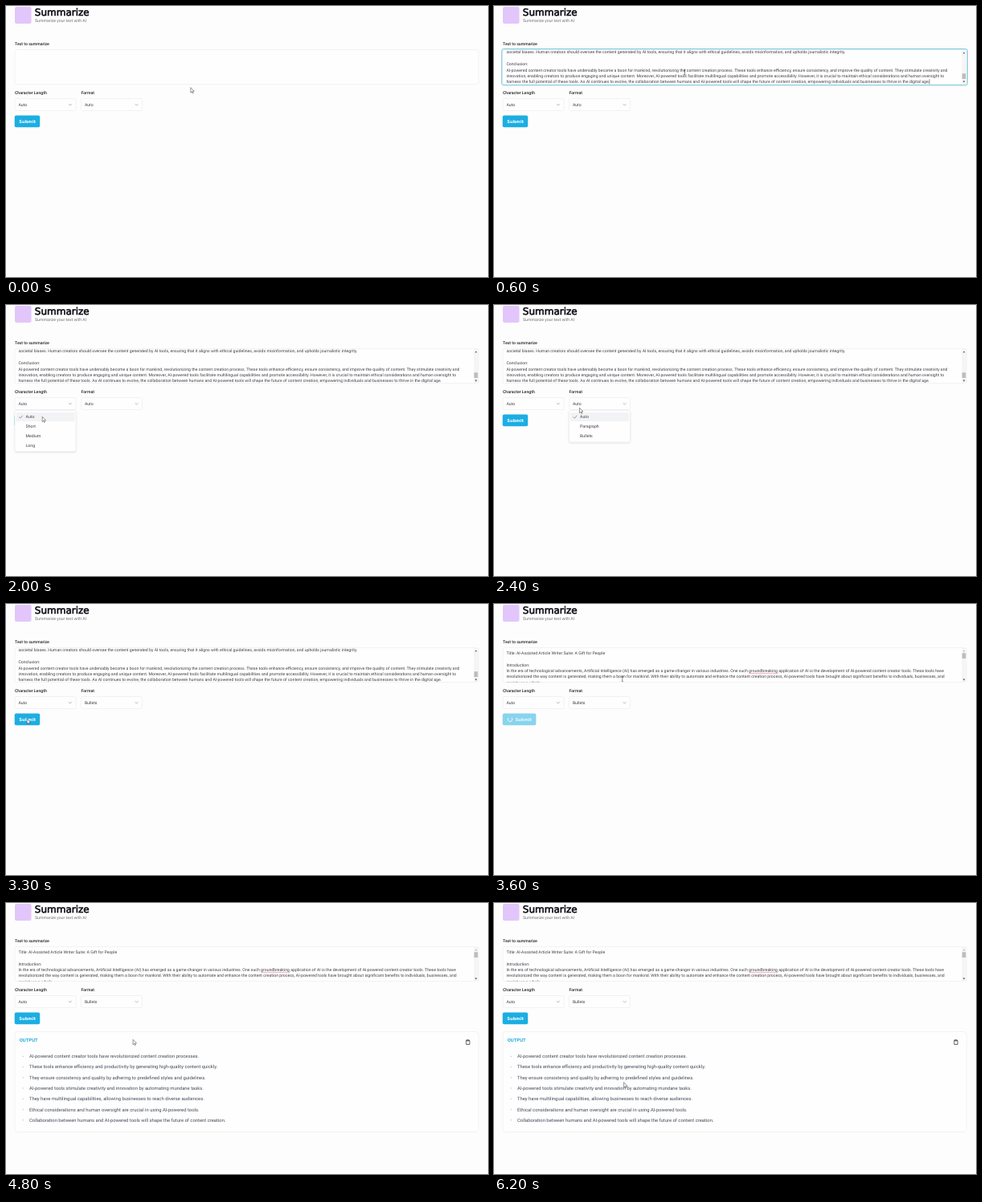
These frames come from a looping animation (600 px wide and 338 px high, 7.3 s). An HTML page:

```html
<!DOCTYPE html>
<html lang="en">
<head>
<meta charset="utf-8">
<title>Summarize</title>
<style>
  html, body { margin: 0; width: 100%; height: 100%; overflow: hidden; background: #fdfdfd; }
  svg { display: block; width: 100vw; height: 100vh; }
  text { font: 5.165px Roboto, sans-serif; fill: #3f3f46; white-space: pre; text-rendering: geometricPrecision; }
  .label { font-weight: 500; fill: #222228; }
  .muted { fill: #71717a; }
  .title { font: 12px "DejaVu Sans", sans-serif; fill: #0c0c14; stroke: #0c0c14; stroke-width: .6; }
  .cta { font: bold 5.15px "DejaVu Sans", sans-serif; fill: #fff; }
  .list text { font-size: 5.89px; fill: #434a57; }
  .list .head { font-weight: 700; fill: #1cabdf; }
  .box { fill: #fefefe; stroke: #e6e7ea; stroke-width: .5; }
  .line { fill: none; stroke: #52525b; stroke-width: .55; stroke-linecap: round; stroke-linejoin: round; }
</style>
</head>
<body>
<svg id="stage" viewBox="0 0 600 338">
  <defs>
    <clipPath id="view"><rect x="11" y="54.8" width="577" height="42.6"/></clipPath>
    <filter id="shadow" x="-10%" y="-10%" width="120%" height="130%">
      <feDropShadow dx="0" dy="1" stdDeviation="1" flood-color="#000" flood-opacity=".12"/>
    </filter>
  </defs>
  <rect width="600" height="338" fill="#fdfdfd"/>
  <rect x="11" y="1" width="20.5" height="21" rx="2" fill="#e2c6fb"/>
  <text class="title" x="35.8" y="12.2">Summarize</text>
  <text class="muted" x="36" y="19.9">Summarize your text with AI</text>
  <text class="label" x="11" y="49.1">Text to summarize</text>
  <rect class="box" x="11" y="54.5" width="577.3" height="43" rx="2"/>
  <rect id="ring" x="9.7" y="53.6" width="579.6" height="45.2" rx="2.5" fill="none" stroke="#55b9d6" stroke-width=".85"/>
  <g clip-path="url(#view)">
    <g id="ending"></g>
    <g id="opening"></g>
  </g>
  <path id="caret" d="M542 91.4v6" stroke="#111" stroke-width=".5"/>
  <g id="bar">
    <rect x="582.3" y="55" width="5.5" height="42.2" fill="#f5f5f5"/>
    <rect id="thumb" x="582.7" width="4.6" height="6.8" fill="#bdbdbd"/>
    <path id="up" d="M583.6 59.2h2.8l-1.4-1.8z"/>
    <path d="M583.6 93.6h2.8l-1.4 1.8z" fill="#505050"/>
  </g>
  <text class="label" x="11" y="110.2">Character Length</text>
  <text class="label" x="93.4" y="110.2">Format</text>
  <g id="selects"></g>
  <rect id="btn" x="10.7" y="136.4" height="14.8" rx="2"/>
  <text id="submit" class="cta" y="145.7">Submit</text>
  <path id="spin" d="M0-2.7A2.7 2.7 0 1 1-2.7 0" fill="none" stroke="#fff" stroke-width=".8"/>
  <g id="output" class="list"></g>
  <g id="lengthMenu"></g>
  <g id="formatMenu"></g>
  <path id="arrow" d="M.2.3V6.7L1.6 5.3 2.6 7.5 3.5 7.1 2.5 4.9H4.6Z" fill="#fff" stroke="#333" stroke-width=".5"/>
  <path id="beam" d="M-1-3.4Q0-3.4 0-2.8Q0-3.4 1-3.4M0-2.8V2.8M-1 3.4Q0 3.4 0 2.8Q0 3.4 1 3.4" fill="none" stroke="#222" stroke-width=".5"/>
</svg>
<script>
const LOOP = 7300, STEP = 100, LINE = 7.35, ROW = 11.7;
const $ = id => document.getElementById(id);
const text = (x, y, s, attrs = '') => `<text x="${x}" y="${y}" ${attrs}>${s}</text>`;
const lines = (rows, top) => rows.map((s, i) => s && text(15.4, top + i * LINE, s)).join('');

const ending = [
  'societal biases. Human creators should oversee the content generated by AI tools, ensuring that it aligns with ethical guidelines, avoids misinformation, and upholds journalistic integrity.',
  '',
  'Conclusion:',
  'AI-powered content creator tools have undeniably become a boon for mankind, revolutionizing the content creation process. These tools enhance efficiency, ensure consistency, and improve the quality of content. They stimulate creativity and',
  'innovation, enabling creators to produce engaging and unique content. Moreover, AI-powered tools facilitate multilingual capabilities and promote accessibility. However, it is crucial to maintain ethical considerations and human oversight to',
  'harness the full potential of these tools. As AI continues to evolve, the collaboration between humans and AI-powered tools will shape the future of content creation, empowering individuals and businesses to thrive in the digital age.'
];
const opening = [
  'Title: AI-Assisted Article Writer Suite: A Gift for People',
  '',
  'Introduction:',
  'In the era of technological advancements, Artificial Intelligence (AI) has emerged as a game-changer in various industries. One such groundbreaking application of AI is the development of AI-powered content creator tools. These tools have',
  'revolutionized the way content is generated, making them a boon for mankind. With their ability to automate and enhance the content creation process, AI-powered tools have brought about significant benefits to individuals, businesses, and',
  'society as a whole.'
];
const summary = [
  'AI-powered content creator tools have revolutionized content creation processes.',
  'These tools enhance efficiency and productivity by generating high-quality content quickly.',
  'They ensure consistency and quality by adhering to predefined styles and guidelines.',
  'AI-powered tools stimulate creativity and innovation by automating mundane tasks.',
  'They have multilingual capabilities, allowing businesses to reach diverse audiences.',
  'Ethical considerations and human oversight are crucial in using AI-powered tools.',
  'Collaboration between humans and AI-powered tools will shape the future of content creation.'
];

function select(x, id) {
  return `<rect class="box" x="${x}" y="115.5" width="76" height="15" rx="2"/>` +
    text(x + 4.4, 124.9, 'Auto', `id="${id}"`) +
    `<path class="line" opacity=".75" d="M${x + 67.4} 122.5l1.6 1.6 1.6-1.6"/>`;
}

function menu(x, options) {
  return `<rect class="box" x="${x}" y="131.5" width="76" height="${options.length * ROW + 4.4}" rx="2" filter="url(#shadow)"/>` +
    `<rect class="hover" x="${x + 1.6}" width="72.8" height="11.2" rx="1" fill="#f2f3f5"/>` +
    `<path class="line" d="M${x + 5.4} 139.8l1.4 1.4 2.7-3.1"/>` +
    options.map((s, i) => text(x + 13.6, 141.4 + i * ROW, s)).join('');
}

// The last line of the ending sits just inside the view.
$('ending').innerHTML = lines(ending, 96.2 - 5 * LINE);
$('opening').innerHTML = lines(opening, 63) +
  '<path d="M317.3 86.6' + 'q.5-.7 1 0t1 0'.repeat(18) + '" fill="none" stroke="#e0455a" stroke-width=".5"/>';
$('selects').innerHTML = select(11, 'length') + select(93.5, 'format');
$('lengthMenu').innerHTML = menu(11, ['Auto', 'Short', 'Medium', 'Long']);
$('formatMenu').innerHTML = menu(93.5, ['Auto', 'Paragraph', 'Bullets']);
$('output').innerHTML =
  '<rect class="box" x="11" y="160.5" width="577.3" height="125" rx="3.5"/>' +
  text(16.8, 172.6, 'OUTPUT', 'class="head"') +
  '<path class="line" style="stroke:#222;stroke-width:.7" d="M573.9 171.4h-1v5h4.2v-5h-1M573.9 170.8h2.2v1.1h-2.2z"/>' +
  summary.map((s, i) => {
    const y = 191.2 + i * 13.27;
    return `<circle cx="21.2" cy="${y}" r=".8" fill="#c9cdd4"/>` + text(29, y + 2, s);
  }).join('');

// Pointer path: time, x, y
const path = [
  [0, 229.7, 101.4], [400, 237.5, 84], [600, 237.5, 82.4], [800, 236, 84], [900, 236, 84],
  [1400, 46.7, 127.6], [1600, 48, 139], [1700, 48, 139], [2000, 45, 139], [2300, 105, 127], [2400, 106.3, 128],
  [2500, 106.3, 128], [2800, 110, 160], [2900, 108, 160], [3300, 26, 143], [3400, 26, 143],
  [3600, 159.8, 93.3], [3900, 159, 120], [4100, 159, 120], [4800, 157.9, 170], [4900, 157.2, 215],
  [5000, 157.2, 222.5], [5600, 158.5, 223.5], [5800, 158.5, 223.5], [6200, 161.4, 223.4], [LOOP, 161.4, 223.4]
];

function pointer(t) {
  const i = path.findIndex(p => p[0] > t);
  const [t0, x0, y0] = path[i - 1], [t1, x1, y1] = path[i];
  const k = (t - t0) / (t1 - t0);
  return [x0 + (x1 - x0) * k, y0 + (y1 - y0) * k];
}

const show = (id, on) => $(id).setAttribute('display', on ? 'inline' : 'none');
const set = (id, attrs) => { for (const k in attrs) $(id).setAttribute(k, attrs[k]); };

function hover(id, y) {
  const row = Math.max(0, Math.floor((y - 133.8) / ROW));
  $(id).querySelector('.hover').setAttribute('y', 134 + row * ROW);
}

function draw(time) {
  const t = Math.floor(time / STEP) * STEP;
  const within = (a, b) => t >= a && t < b;
  const [x, y] = pointer(t);
  const filled = t >= 600, top = t >= 3500, busy = within(3400, 3900);

  show('ring', within(300, 1400));
  show('ending', filled && !top);
  show('opening', top);
  show('caret', within(600, 1200));
  show('bar', filled);
  set('thumb', { y: top ? 61.2 : 84.2 });
  set('up', { fill: top ? '#b0b0b0' : '#505050' });

  show('lengthMenu', within(1500, 2100));
  show('formatMenu', within(2300, 2900));
  hover('lengthMenu', y);
  hover('formatMenu', y);
  $('format').textContent = t >= 2900 ? 'Bullets' : 'Auto';

  set('btn', { width: busy ? 41.7 : 31.5, fill: busy ? '#88d4ee' : '#1caee2' });
  set('submit', { x: busy ? 26.4 : 16.3, opacity: busy ? .85 : 1 });
  show('spin', busy);
  set('spin', { transform: `translate(20 143.9) rotate(${(t - 3600) * .36 + 45})` });
  show('output', t >= 3900);

  const inText = x > 11 && x < 582 && y > 54 && y < 97.5;
  show('beam', inText);
  show('arrow', !inText);
  set(inText ? 'beam' : 'arrow', { transform: `translate(${x} ${y})` });
}

const start = performance.now();
function tick() {
  draw((performance.now() - start) % LOOP);
  requestAnimationFrame(tick);
}
tick();
</script>
</body>
</html>
```
